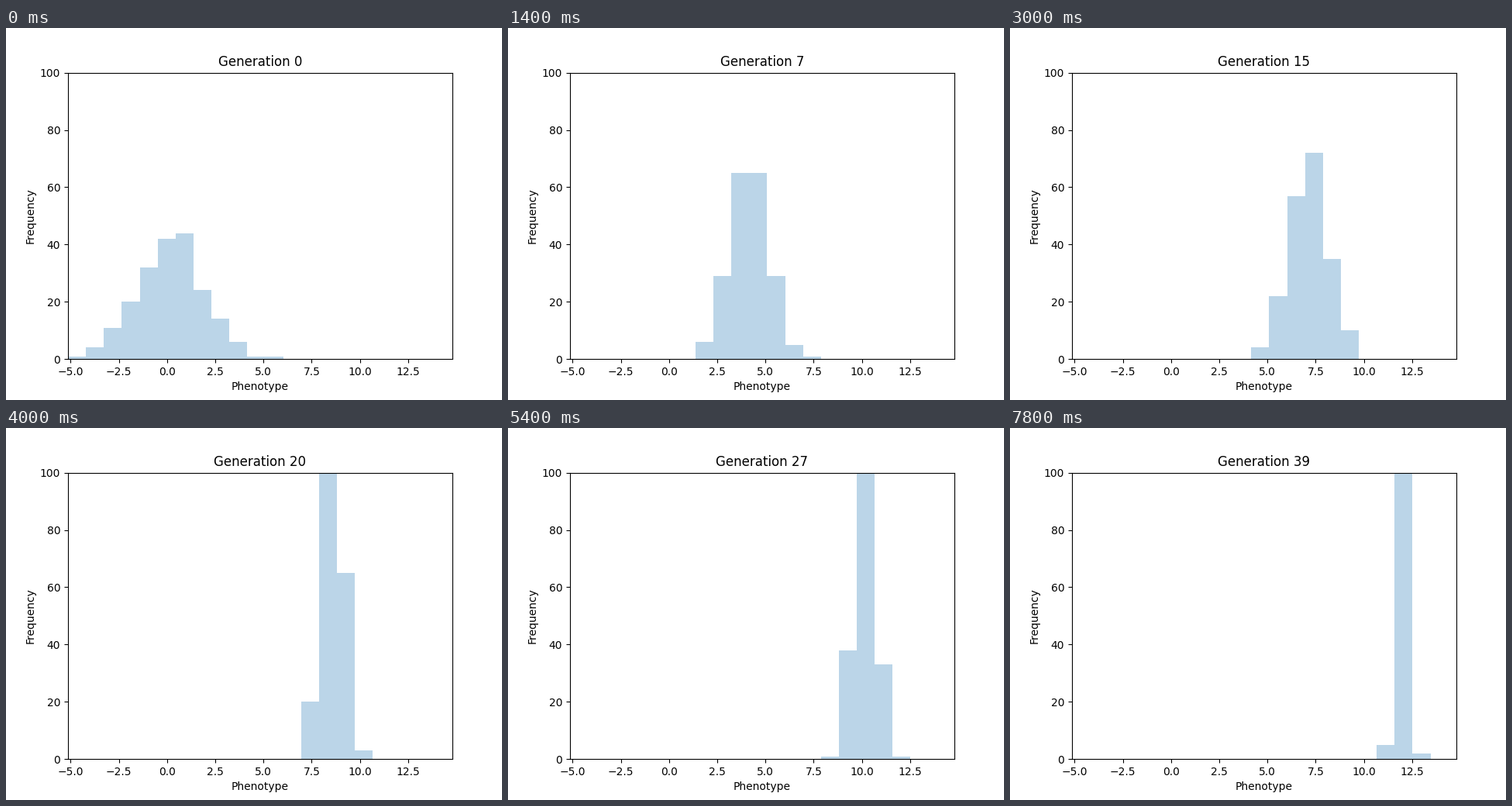
Recreate the animation shown at these times as a matplotlib script. Size 640x480 px, loop 8000 ms.

```python
import math

import matplotlib.pyplot as plt
import numpy as np
from matplotlib.animation import FuncAnimation

GENERATIONS, INTERVAL = 40, 200
SIZE, BINS = 200, 20
X_MIN, X_MAX = -5.138, 13.455
EDGES = np.linspace(X_MIN, X_MAX, BINS + 1)

# evenly ranked normal scores, one per individual
z = np.linspace(-4, 4, 2001)
cdf = [0.5 * (1 + math.erf(v / math.sqrt(2))) for v in z]
SCORES = np.interp((np.arange(SIZE) + 0.5) / SIZE, cdf, z)


def mean(gen):
    """Selection pulls the mean up, ever more slowly."""
    return 0.66 + 14.4 * (1 - math.exp(-0.04 * gen)) - 0.48 * math.exp(-gen / 2)


def spread(gen):
    """Variation shrinks, with a short recovery after the first sweep."""
    return np.interp(gen, [0, 3, 10, 15, 20, 27, 39],
                     [1.74, 1.3, 0.71, 0.99, 0.53, 0.53, 0.21])


def frequencies(gen):
    noise = np.random.default_rng(gen).normal(0, 0.1, SIZE)
    people = mean(gen) + spread(gen) * (SCORES + noise)
    return np.histogram(np.clip(people, X_MIN, X_MAX), bins=EDGES)[0]


fig, ax = plt.subplots(figsize=(6.4, 4.8), dpi=100)
bars = ax.bar(EDGES[:-1], frequencies(0), width=np.diff(EDGES),
              align="edge", color="C0", alpha=0.3)
ax.set_xlim(X_MIN, X_MAX * 1.1)
ax.set_ylim(0, 100)
ax.set_xlabel("Phenotype")
ax.set_ylabel("Frequency")
title = ax.set_title("Generation 0")


def update(gen):
    for bar, height in zip(bars, frequencies(gen)):
        bar.set_height(height)
    title.set_text(f"Generation {gen}")
    return [*bars, title]


anim = FuncAnimation(fig, update, frames=GENERATIONS, interval=INTERVAL,
                     repeat=True, repeat_delay=0)
plt.show()
```
